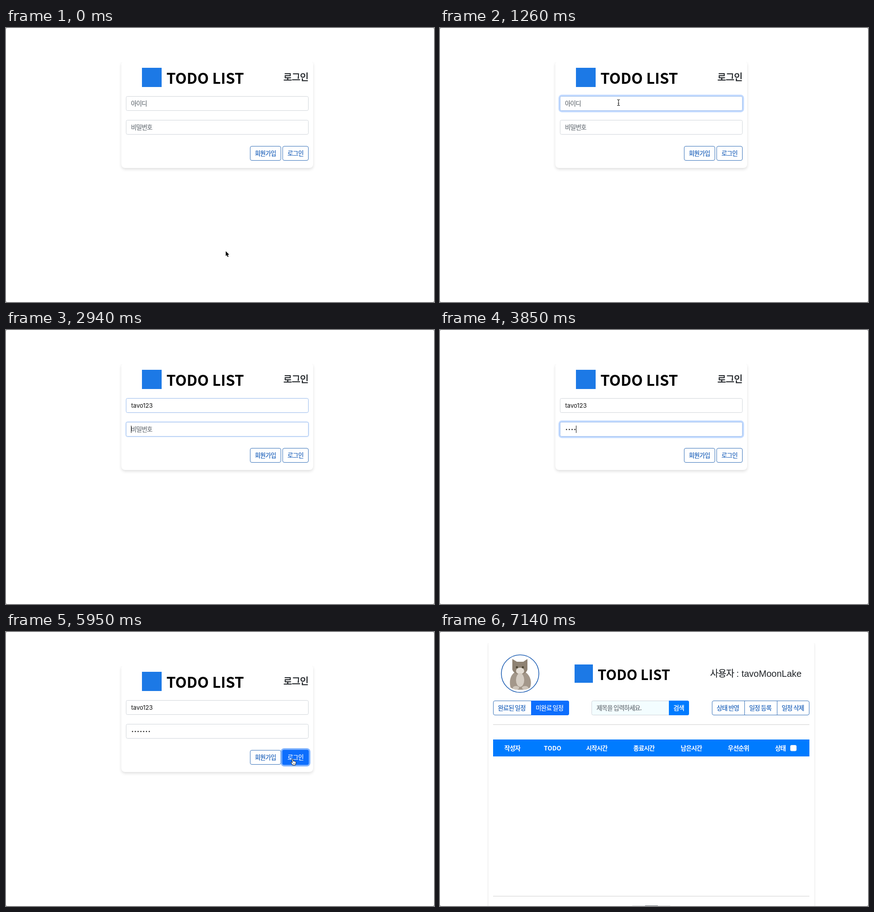
These frames come from a looping animation (935 by 599 pixels, 7.49 s). An HTML page with a canvas:

```html
<!DOCTYPE html>
<html lang="ko">
<head>
<meta charset="utf-8">
<title>TODO LIST</title>
<style>
html, body { margin: 0; width: 100%; height: 100%; overflow: hidden; background: #fff; }
canvas { display: block; }
</style>
</head>
<body>
<canvas id="stage" width="935" height="599"></canvas>
<script>
const ctx = document.getElementById('stage').getContext('2d');
const LOOP = 7490, TICK = 70;
const KR = '"Noto Sans CJK KR", "Noto Sans CJK", sans-serif';
const UI = 'Inter, sans-serif';
const ARIAL = '"Liberation Sans", Arial, sans-serif';
const BLUE = '#0d6efd', HEAD = '#007bff', MARK = '#1c79e6';
const OUTLINE = '#3570b8', LINK = '#155cb8', GREY = '#666d74', INK = '#212529';
const ID = { x: 262.5, y: 149.5, w: 398, h: 31 };
const PW = { ...ID, y: 201.5 };
const JOIN = { x: 533.5, y: 258.5, w: 67, h: 31 };
const LOGIN = { x: 604.5, y: 258.5, w: 56, h: 31 };
const PAGE_AT = 6090;

// pointer track: time, x, y
const TRACK = [
  [0, 480, 488], [140, 545, 420], [280, 607, 300], [490, 396, 163],
  [630, 396, 163], [840, 392, 140], [980, 390, 163],
  [4550, 390, 163], [4760, 470, 141], [5110, 604, 254], [5250, 626, 277],
  [5320, 626, 279], [5390, 627, 278], [6160, 627, 278], [6510, 474, 368],
  [6580, 474, 393], [6720, 474, 393], [6930, 699, 168], [7140, 455, 612]
];

const ramp = (t, a, b) => Math.min(1, Math.max(0, (t - a) / (b - a)));
const within = (t, a, b) => t >= a && t < b;
const inside = (p, r) => p.x > r.x && p.x < r.x + r.w && p.y > r.y && p.y < r.y + r.h;
const countFrom = (t, times) => times.filter(s => t >= s).length;

function pointerAt(t) {
  const i = TRACK.findIndex(k => k[0] >= t);
  if (i < 0) return { x: 455, y: 612 };
  if (i === 0) return { x: TRACK[0][1], y: TRACK[0][2] };
  const [t0, x0, y0] = TRACK[i - 1], [t1, x1, y1] = TRACK[i];
  const p = ramp(t, t0, t1);
  return { x: x0 + (x1 - x0) * p, y: y0 + (y1 - y0) * p };
}

// heft thickens the strokes for weights between regular and bold
function text(str, x, y, size, { font = KR, color = INK, weight = 400, gap = 0, align = 'left', heft = 0 } = {}) {
  ctx.font = `${weight} ${size}px ${font}`;
  ctx.letterSpacing = gap + 'px';
  ctx.textAlign = align;
  ctx.fillStyle = color;
  ctx.fillText(str, x, y);
  if (!heft) return;
  ctx.lineWidth = heft;
  ctx.strokeStyle = color;
  ctx.strokeText(str, x, y);
}

const label = (str, x, y, color, opts = {}) => text(str, x, y, 13.5, { color, gap: -0.8, heft: 0.2, ...opts });

function box(x, y, w, h, r, fill, stroke) {
  ctx.beginPath();
  ctx.roundRect(x, y, w, h, r);
  if (fill) { ctx.fillStyle = fill; ctx.fill(); }
  if (stroke) { ctx.lineWidth = 1; ctx.strokeStyle = stroke; ctx.stroke(); }
}

function rect(x, y, w, h, fill) {
  ctx.fillStyle = fill;
  ctx.fillRect(x, y, w, h);
}

function shape(d, fill, stroke, lw = 1) {
  const p = new Path2D(d);
  if (fill) { ctx.fillStyle = fill; ctx.fill(p); }
  if (stroke) { ctx.lineWidth = lw; ctx.strokeStyle = stroke; ctx.stroke(p); }
}

function oval(x, y, rx, ry, fill) {
  ctx.beginPath();
  ctx.ellipse(x, y, rx, ry, 0, 0, 7);
  ctx.fillStyle = fill;
  ctx.fill();
}

function card(x, y, w, h, r, dy, blur, alpha) {
  ctx.save();
  ctx.shadowColor = `rgba(0,0,0,${alpha})`;
  ctx.shadowBlur = blur;
  ctx.shadowOffsetY = dy;
  box(x, y, w, h, r, '#fff');
  ctx.restore();
}

function ring(r, amount, alpha, size = 3.2) {
  if (!amount) return;
  const s = size * amount + 0.5;
  box(r.x - s, r.y - s, r.w + 2 * s, r.h + 2 * s, 3.5 + s, `rgba(13,110,253,${alpha * amount})`);
}

function field(r, focus) {
  ring(r, focus, 0.25);
  box(r.x, r.y, r.w, r.h, 3, '#fff', focus > 0.1 ? '#9dbdec' : '#d0d5da');
}

const caret = (x, y) => rect(Math.round(x), y, 1, 16, '#111');

function popup(t) {
  if (!within(t, 1960, 2660)) return;
  const w = t < 2520 ? 236 : 130.5;
  ctx.save();
  ctx.shadowColor = 'rgba(0,0,0,.35)';
  ctx.shadowBlur = 4;
  ctx.shadowOffsetY = 1;
  box(345.5, 188.5, w, 187, 6, '#1c1c1c');
  ctx.restore();
  shape('M354 189 C358 188 361 182 363 182 S368 188 372 189 Z', '#1c1c1c');
  [1, 12, 10, 11, 13, 14].forEach((n, i) =>
    text('tavo' + n, 355.5, 211 + 30 * i, 11, { font: UI, weight: 600, color: '#f2f2f2' }));
}

function loginPage(t) {
  card(252, 72, 419, 234, 8, 3, 6, 0.13);
  rect(240, 56, 440, 18, '#fff');
  rect(297, 87, 43, 42, MARK);
  text('TODO LIST', 350.5, 122, 32.5, { weight: 700, color: '#000' });
  text('로그인', 606, 114.5, 20.6, { gap: -0.8, heft: 0.6 });

  const idFocus = ramp(t, 840, 1050) * (1 - ramp(t, 2800, 2980));
  const pwFocus = ramp(t, 2870, 3010) * (1 - ramp(t, 5740, 5900));
  field(ID, idFocus);
  field(PW, pwFocus);

  const typed = 'tavo123'.slice(0, countFrom(t, [1820, 1890, 1960, 2100, 2520, 2590, 2660]));
  if (typed) text(typed, 273.5, 170, 13, { font: UI, color: '#111' });
  else label('아이디', 273, 169.5, GREY);
  if (within(t, 980, 1260) || within(t, 1820, 2870)) {
    caret(typed ? 273.5 + ctx.measureText(typed).width : 273, 157);
  }

  const dots = countFrom(t, [3570, 3710, 3780, 3850, 4200, 4200, 4340]);
  if (!dots) label('비밀번호', 273, 221.5, GREY);
  for (let i = 0; i < dots; i++) oval(276.4 + 6.1 * i, 217.5, 1.3, 1.3, '#111');
  if (within(t, 2870, 3430) || within(t, 3570, 4830) || within(t, 5390, 5810)) {
    caret(273 + 6.1 * dots, 209);
  }

  const hover = ramp(t, 5110, 5320), pressed = ramp(t, 5740, 5900);
  box(JOIN.x, JOIN.y, JOIN.w, JOIN.h, 3.5, '#fff', OUTLINE);
  label('회원가입', 543.5, 278.5, LINK);
  ring(LOGIN, pressed, 0.5, 4);
  box(LOGIN.x, LOGIN.y, LOGIN.w, LOGIN.h, 3.5, '#fff', OUTLINE);
  if (hover) {
    ctx.globalAlpha = hover;
    box(LOGIN.x - 1, LOGIN.y - 1, LOGIN.w + 2, LOGIN.h + 2, 4, BLUE);
    ctx.globalAlpha = 1;
  }
  label('로그인', 615, 278.5, hover > 0.4 ? '#fff' : LINK);
  popup(t);
}

function avatar() {
  oval(175, 91, 41, 41, '#fff');
  shape('M154 121 C150 104 156 92 164 88 L187 88 C198 96 201 110 197 121 C190 128 161 128 154 121 Z', '#a3978a');
  shape('M158 82 L158 59 L168 65 L182 65 L191 59 L191 82 C188 96 162 96 158 82 Z', '#8f8272');
  oval(175, 85, 9, 7, '#e3dcd3');
  oval(175, 105, 9, 15, '#d5cdc3');
  oval(166, 122, 7, 4, '#cfc6bb');
  oval(186, 122, 7, 4, '#cfc6bb');
  oval(168, 77, 2.3, 2.3, '#4b4330');
  oval(181, 77, 2.3, 2.3, '#4b4330');
  ctx.beginPath();
  ctx.arc(175, 91, 41, 0, 7);
  ctx.lineWidth = 1.6;
  ctx.strokeStyle = '#2161b5';
  ctx.stroke();
}

function listPage() {
  card(106, 20, 711.5, 640, 8, 2, 5, 0.13);
  rect(90, 0, 750, 24, '#fff');
  avatar();
  rect(294, 71, 40, 40, MARK);
  text('TODO LIST', 344.5, 104.5, 30.4, { weight: 700, color: '#000' });
  text('사용자', 590, 98, 20, { gap: -1, heft: 0.2 });
  text(' : tavoMoonLake', 642, 98, 20, { font: ARIAL });

  box(116.5, 150.5, 165, 31, 3.5, '#fff', OUTLINE);
  box(199, 150, 83, 32, [0, 4, 4, 0], BLUE);
  label('완료된 일정', 126.5, 170.5, LINK);
  label('미완료 일정', 209, 170.5, '#fff');

  box(331.5, 150.5, 169, 31, [3, 0, 0, 3], '#f3fdff', '#ced4da');
  label('제목을 입력하세요.', 342, 170.5, GREY);
  box(500, 150, 44, 32, [0, 3.5, 3.5, 0], HEAD);
  label('검색', 510, 170.5, '#fff', { heft: 0.4 });

  box(594.5, 150.5, 212, 31, 3.5, '#fff', OUTLINE);
  rect(665, 151, 1, 30, OUTLINE);
  rect(736, 151, 1, 30, OUTLINE);
  ['상태 반영', '일정 등록', '일정 삭제'].forEach((s, i) => label(s, 604.5 + 71 * i, 170.5, LINK));

  rect(116, 202, 691, 1, '#cfcfcf');
  rect(116, 577, 691, 1, '#cfcfcf');
  rect(116, 235, 691, 37, HEAD);
  const bold = { weight: 700, align: 'center', heft: 0 };
  text('TODO', 246, 258.5, 13.3, { ...bold, color: '#fff' });
  [['작성자', 158], ['시작시간', 342.5], ['종료시간', 445.5], ['남은시간', 549], ['우선순위', 652], ['상태', 743.5]]
    .forEach(([s, x]) => label(s, x, 258.5, '#fff', bold));
  box(765.5, 247.5, 13, 12.5, 2.5, '#fff', '#d8e6f5');

  rect(420, 598, 83, 1, '#d6d9dc');
  rect(448, 598, 28, 1, '#5c636a');
}

function arrow() {
  const d = 'M0 0 V10.6 L2.4 8.4 L4.2 12.5 L6.1 11.7 L4.3 7.7 L7.6 7.5 Z';
  shape(d, null, '#fff', 1.2);
  shape(d, '#000');
}

function beam() {
  shape('M-3 -6.5 Q0 -6.5 0 -4.5 Q0 -6.5 3 -6.5 M0 -5 V5 M-3 6.5 Q0 6.5 0 4.5 Q0 6.5 3 6.5 M-1.5 1.5 H1.5', null, '#222', 1.2);
}

function hand() {
  shape('M-2.2 0.6 C-2.2 -1 0 -1 0.2 0.6 L0.7 4.6 C1.2 3.7 2.6 3.8 2.8 4.9 C3.5 4.1 4.8 4.4 4.9 5.5 ' +
    'C5.8 5 6.6 5.6 6.5 6.8 C6.4 9.5 5.3 10.2 5.2 13 H-1 C-1.3 10.7 -3.6 9.5 -4.5 7.4 C-4.4 6 -2.6 6.4 -1.6 7.8 Z',
    '#fff', '#111', 1);
  shape('M1.1 8.5 V11 M3 8.5 V11', null, '#111', 0.7);
}

function pointer(t) {
  if (within(t, 1820, 4620) || t >= 7140) return;
  const p = pointerAt(t), login = t < PAGE_AT;
  ctx.save();
  ctx.translate(p.x, p.y);
  if (login && (inside(p, ID) || inside(p, PW))) beam();
  else if (login && (inside(p, LOGIN) || inside(p, JOIN))) hand();
  else arrow();
  ctx.restore();
}

function corners() {
  for (const x of [0, 934]) for (const y of [0, 598]) rect(x, y, 1, 1, '#555');
}

function draw(ms) {
  const t = Math.floor((ms % LOOP) / TICK) * TICK;
  rect(0, 0, 935, 599, '#fff');
  if (t < PAGE_AT) loginPage(t);
  else listPage();
  pointer(t);
  corners();
}

const start = performance.now();
function tick() {
  draw(performance.now() - start);
  requestAnimationFrame(tick);
}
tick();
</script>
</body>
</html>
```
